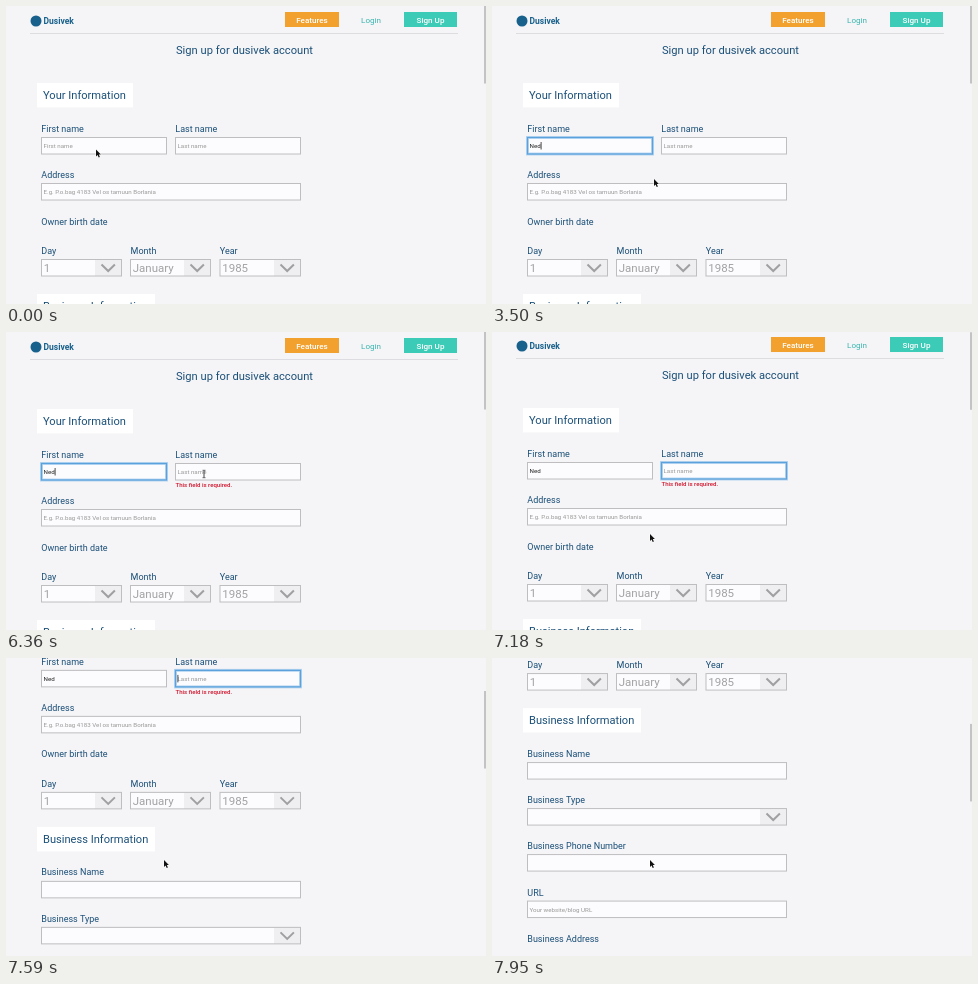
Write an HTML page with a canvas that moves like this. It is 480 by 298 pixels and loops after 8 s.

```html
<!DOCTYPE html>
<html lang="en">
<head>
<meta charset="utf-8">
<title>Sign up form</title>
<style>
  html, body { margin: 0; width: 100%; height: 100%; overflow: hidden; background: #f5f4f6; }
  canvas { display: block; width: 480px; height: 298px; }
</style>
</head>
<body>
<canvas id="stage"></canvas>
<script>
const W = 480, H = 298, LOOP = 8000;
const BLUE = '#1b5079', TEAL = '#3ccbb7', GREY = '#999';
const canvas = document.getElementById('stage');
const ctx = canvas.getContext('2d');
const dpr = window.devicePixelRatio || 1;
canvas.width = W * dpr;
canvas.height = H * dpr;

// Pointer stops: time, x, y
const path = [
  [0, 90, 143.5], [750, 90, 143.5], [1350, 120, 156], [2600, 120, 156],
  [3150, 162, 173], [3800, 162, 173], [4250, 205, 142], [4600, 205, 142],
  [5000, 125, 145], [5800, 125, 145], [6350, 198, 142], [6600, 198, 142],
  [7000, 158, 202], [LOOP, 158, 202]
];

// Focus changes: time, field
const focuses = [[450, 'first'], [4300, 'last'], [5060, 'first'], [6420, 'last']];
const typed = 'Ned', keyTimes = [1950, 2180, 2420];
const ERROR_AT = 5060, SCROLL_AT = 7150, RAMP = 160, SPEED = 0.33;

const fields = [
  { id: 'first', x: 35.5, y: 131.5, w: 125, hint: 'First name' },
  { id: 'last', x: 169.5, y: 131.5, w: 125, hint: 'Last name' },
  { id: 'address', x: 35.5, y: 177.5, w: 259, hint: 'E.g. P.o.bag 4183 Vel os tamuun Borlania' },
  { id: 'business', x: 35.5, y: 342.5, w: 259 },
  { id: 'phone', x: 35.5, y: 434.5, w: 259 },
  { id: 'url', x: 35.5, y: 481, w: 259, hint: 'Your website/blog URL' }
];
const selects = [
  [35.5, 253.5, 80, '1'], [124.5, 253.5, 80, 'January'],
  [214, 253.5, 80.5, '1985'], [35.5, 388.5, 259, '']
];
const labels = [
  ['First name', 35.3, 125.7], ['Last name', 169.3, 125.7], ['Address', 35.3, 172.2],
  ['Owner birth date', 35.3, 218.6], ['Day', 35.3, 248], ['Month', 124.6, 248],
  ['Year', 213.8, 248], ['Business Name', 35.3, 336.6], ['Business Type', 35.3, 383],
  ['Business Phone Number', 35.3, 429.4], ['URL', 35.3, 475.8], ['Business Address', 35.3, 522.2]
];

function text(str, x, y, size, color, weight = 400, align = 'left') {
  ctx.font = `${weight} ${size}px Roboto, sans-serif`;
  ctx.textAlign = align;
  ctx.fillStyle = color;
  ctx.fillText(str, x, y);
}

function box(x, y, w, h, color) {
  ctx.fillStyle = color;
  ctx.fillRect(x, y, w, h);
}

function line(points, color, width) {
  ctx.beginPath();
  points.forEach(([x, y]) => ctx.lineTo(x, y));
  ctx.strokeStyle = color;
  ctx.lineWidth = width;
  ctx.stroke();
}

function frame(x, y, w, h, color = '#bebec0', width = 1) {
  ctx.strokeStyle = color;
  ctx.lineWidth = width;
  ctx.strokeRect(x, y, w, h);
}

function scrollAt(t) {
  const d = t > SCROLL_AT ? t - SCROLL_AT : 0;
  return d < RAMP ? SPEED * d * d / (2 * RAMP) : SPEED * (d - RAMP / 2);
}

function pointerAt(t) {
  const i = path.findIndex(p => p[0] > t);
  const [t0, x0, y0] = path[i - 1], [t1, x1, y1] = path[i];
  const k = (t - t0) / (t1 - t0), e = k * k * (3 - 2 * k);
  return [x0 + (x1 - x0) * e, y0 + (y1 - y0) * e];
}

function drawHeader() {
  ctx.fillStyle = '#17618c';
  ctx.beginPath();
  ctx.arc(30, 15, 5.5, 0, Math.PI * 2);
  ctx.fill();
  text('Dusivek', 37.5, 18.3, 8.5, '#17618c', 700);
  box(279, 6, 54, 15, '#f2a02e');
  box(398, 6, 53, 15, TEAL);
  text('Features', 306, 16.6, 8.1, '#fff', 500, 'center');
  text('Login', 365, 16.6, 8.1, '#39b5b0', 400, 'center');
  text('Sign Up', 424.5, 16.6, 8.1, '#fff', 500, 'center');
  box(24, 27, 428, 1, '#dddce0');
  text('Sign up for dusivek account', 170, 47.8, 11.15, BLUE);
}

function drawSection(title, y, w) {
  box(31, y, w, 24.5, '#fff');
  text(title, 37, y + 16.2, 11.1, BLUE);
}

function drawField(f, t, focus) {
  const { x, y, w } = f;
  const focused = focus && focus[1] === f.id;
  box(x, y, w, 16.5, '#fcfbfd');
  if (focused) {
    frame(x, y, w, 16.5, 'rgba(110,175,230,.45)', 3);
    frame(x, y, w, 16.5, '#5ba2dc', 1.3);
  } else {
    frame(x, y, w, 16.5);
  }
  const keys = f.id === 'first' ? keyTimes.filter(k => k <= t) : [];
  const value = typed.slice(0, keys.length);
  text(value || f.hint || '', x + 2, y + 10.5, 6.2, value ? '#222' : GREY);
  if (!focused) return;
  // The caret restarts its blink at each key or focus
  const since = [focus[0], ...keys].sort((a, b) => b - a)[0];
  if ((t - since) % 1000 < 500) {
    const cx = x + 2 + (value ? ctx.measureText(value).width : 0);
    box(cx, y + 4.5, 0.8, 7.5, '#222');
  }
}

function drawSelect([x, y, w, value]) {
  const right = x + w;
  box(x, y, w, 16.5, '#fcfbfd');
  box(right - 26.5, y, 26.5, 16.5, '#efeef0');
  frame(x, y, w, 16.5);
  text(value, x + 2.2, y + 12.2, 11.5, '#a2a2a4');
  line([[right - 20, y + 5], [right - 13.3, y + 11.5], [right - 6.6, y + 5]], '#a0a0a2', 2);
}

function drawPointer(t, scroll) {
  const [x, y] = pointerAt(t);
  const over = fields.some(f => x > f.x && x < f.x + f.w && y > f.y && y < f.y + 16.5);
  ctx.save();
  ctx.translate(x, y);
  if (over && t > 100 && scroll === 0) {
    line([[0, -3.5], [0, 3.5]], '#333', 0.9);
    line([[-1.5, -3.7], [1.5, -3.7]], '#333', 0.7);
    line([[-1.5, 3.7], [1.5, 3.7]], '#333', 0.7);
  } else {
    const arrow = new Path2D('M0 0V7L1.6 5.6L2.7 8.1L3.9 7.6L2.8 5.1H4.9Z');
    ctx.strokeStyle = '#fff';
    ctx.lineWidth = 1;
    ctx.stroke(arrow);
    ctx.fillStyle = '#111';
    ctx.fill(arrow);
  }
  ctx.restore();
}

function draw(t) {
  const scroll = scrollAt(t);
  const focus = focuses.filter(f => f[0] <= t).pop();
  ctx.setTransform(dpr, 0, 0, dpr, 0, 0);
  box(0, 0, W, H, '#f5f4f6');
  ctx.save();
  ctx.translate(0, -scroll);
  drawHeader();
  drawSection('Your Information', 77, 96);
  drawSection('Business Information', 288, 118);
  labels.forEach(([str, x, y]) => text(str, x, y, 9, BLUE));
  fields.forEach(f => drawField(f, t, focus));
  selects.forEach(drawSelect);
  if (t >= ERROR_AT) text('This field is required.', 169.5, 154.8, 6.05, '#d0142c', 500);
  ctx.restore();
  box(478, scroll * 0.277, 2, 77.5, '#c3c2c5');
  drawPointer(t, scroll);
}

const start = performance.now();
function tick() {
  draw((performance.now() - start) % LOOP);
  requestAnimationFrame(tick);
}
tick();
</script>
</body>
</html>
```
